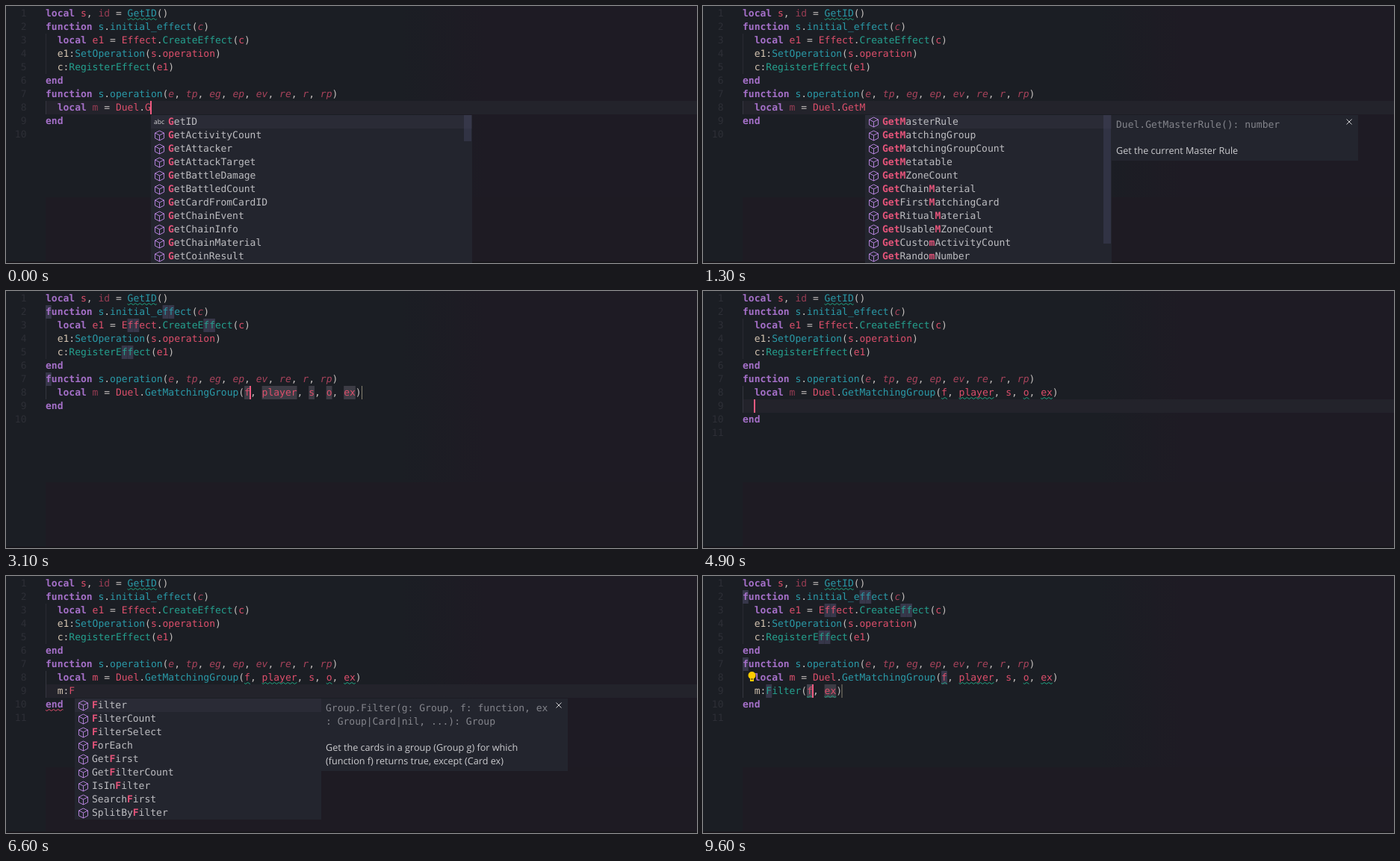
An HTML page with a canvas that plays this animation: 925x344 px, repeating every 9.7 s.

```html
<!DOCTYPE html>
<html lang="en">
<head>
<meta charset="utf-8">
<title>Lua completion</title>
<style>
html, body { margin: 0; width: 100%; height: 100%; overflow: hidden; background: #1b1e24; }
canvas { display: block; }
</style>
</head>
<body>
<canvas id="stage" width="925" height="344"></canvas>
<script>
const ctx = document.getElementById('stage').getContext('2d');
const LOOP = 9700, LEFT = 53, ROW = 18;
const MONO = '13px "DejaVu Sans Mono", monospace';
const SANS = '12.63px "Open Sans", sans-serif';
const GREEN = '#1fa583', RED = '#e5506f', PINK = '#ee5a80';

ctx.textRendering = 'geometricPrecision';
ctx.font = MONO;
const CHAR = ctx.measureText('m').width;

// The first letter of a token picks its style.
const STYLES = {
  k: ['bold', '#a570c9'], r: ['', '#dd4f6b'], d: ['', '#973c53'], i: ['italic', '#a8435b'],
  t: ['', '#2a9aa8'], g: ['', '#25a18f'], w: ['', '#d3c3b0'], p: ['', '#c4bfbd']
};

const HEAD = [
  'klocal|r s|p, |did|p = |tGetID|p()',
  'kfunction|t s|p.|tinitial_effect|p(|ic|p)',
  'p  |klocal|r e1|p = |rEffect|p.|gCreateEffect|p(|rc|p)',
  'w  e1|p:|tSetOperation|p(|rs|p.|roperation|p)',
  'w  c|p:|gRegisterEffect|p(|re1|p)',
  'kend',
  'kfunction|t s|p.|toperation|p(|' +
    'e tp eg ep ev re r rp'.split(' ').map(s => 'i' + s).join('|p, |') + '|p)'
];

const GET_ITEMS = ('GetID GetActivityCount GetAttacker GetAttackTarget GetBattleDamage GetBattledCount ' +
  'GetCardFromCardID GetChainEvent GetChainInfo GetChainMaterial GetCoinResult').split(' ');
const GETM_ITEMS = ('GetMasterRule GetMatchingGroup GetMatchingGroupCount GetMetatable GetMZoneCount ' +
  'GetChainMaterial GetFirstMatchingCard GetRitualMaterial GetUsableMZoneCount ' +
  'GetCustomActivityCount GetRandomNumber').split(' ');
const M_ITEMS = ['m', 'math', 'module', 'setmetatable'];
const GROUP_ITEMS = ('AddCard CheckSameProperty CheckWithSumEqual CheckWithSumGreater Clear Clone ' +
  'CreateGroup DeleteGroup Equal Filter').split(' ');
const F_ITEMS = ('Filter FilterCount FilterSelect ForEach GetFirst GetFilterCount ' +
  'IsInFilter SearchFirst SplitByFilter').split(' ');

const DOCS = {
  GetMasterRule: ['Duel.GetMasterRule(): number', 'Get the current Master Rule'],
  GetMatchingGroup: [
    'Duel.GetMatchingGroup(f: function, pla\nyer: number, s: number, o: number, ex:\n Group|Card|nil, ...): Group',
    "Get all cards in locations (int s) (on (int player)'s\nside of the field) and (int o) (on their opponent's)\nfor which (function f) returns true, except (Card ex)"],
  GetMatchingGroupCount: [
    'Duel.GetMatchingGroupCount(f: functio\nn, player: number, s: number, o: numbe\nr, ex: Group|Card|nil, ...): number',
    "Get the number of cards in locations (int s) (on (int\nplayer)'s side of the field) and (int o) (on their\nopponent's) for which (function f) returns true,\nexcept (Card ex)"],
  AddCard: ['Group.AddCard(g: Group, c: Card)', 'Add a card (Card c) to a group (Group g)'],
  Filter: [
    'Group.Filter(g: Group, f: function, ex\n: Group|Card|nil, ...): Group',
    'Get the cards in a group (Group g) for which\n(function f) returns true, except (Card ex)']
};

const colX = col => LEFT + col * CHAR;
const lineY = line => 1 + (line - 1) * ROW;
const within = (t, from, to) => t >= from && t < to;
// Value of the last [start, value] step that has begun.
const pick = (t, steps) => steps.filter(s => t >= s[0]).pop()[1];

function rect(x, y, w, h, color) {
  ctx.fillStyle = color;
  ctx.fillRect(x, y, w, h);
}

function text(str, x, y, color, font = MONO) {
  ctx.font = font;
  ctx.fillStyle = color;
  ctx.fillText(str, x, y);
}

function path(points, color, close) {
  ctx.beginPath();
  points.forEach(p => ctx.lineTo(...p));
  if (close) ctx.closePath();
  ctx.strokeStyle = color;
  ctx.lineWidth = 1;
  ctx.stroke();
}

function background() {
  rect(0, 0, 925, 344, '#1b1e24');
  const glow = ctx.createLinearGradient(530, 0, 640, 0);
  glow.addColorStop(0, '#1e1b2400');
  glow.addColorStop(1, '#1e1b24');
  rect(530, 0, 395, 256, glow);
  rect(LEFT, 256, 872, 88, '#1e1b23');
  rect(0, 342, 925, 2, '#17161b');
}

function codeLine(tokens, line) {
  let col = 0;
  for (const token of tokens.split('|')) {
    const [weight, color] = STYLES[token[0]], str = token.slice(1);
    text(str, colX(col), lineY(line) + 13, color, weight + ' ' + MONO);
    col += str.length;
  }
}

function mark(line, col, len, color) {
  rect(colX(col), lineY(line), len * CHAR, ROW, color);
}

function squiggle(line, col, len, color) {
  const x = colX(col), y = lineY(line) + 15, points = [];
  for (let k = -1; k * 3 < len * CHAR + 3; k++) points.push([x + k * 3 + 1.7, y + (k % 2 ? .5 : 2.5)]);
  ctx.save();
  ctx.beginPath();
  ctx.rect(x, y - 1, len * CHAR, 5);
  ctx.clip();
  path(points, color);
  ctx.restore();
}

function cube(x, y) {
  const hex = [[0, -6.5], [6, -3.5], [6, 3.5], [0, 6.5], [-6, 3.5], [-6, -3.5]].map(p => [x + p[0], y + p[1]]);
  path(hex, '#b180d7', true);
  path([hex[5], [x, y - .5], hex[1]], '#b180d7');
  path([[x, y - .5], hex[3]], '#b180d7');
}

function bulb(line) {
  const y = lineY(line);
  ctx.beginPath();
  ctx.arc(65.5, y + 6, 5, 0, 7);
  ctx.fillStyle = '#fc0';
  ctx.fill();
  rect(63, y + 10, 5, 4, '#fc0');
  rect(64, y + 10.5, 3, 1, '#1b1e24');
}

function docPanel(name, x, y) {
  const [sig, body] = DOCS[name].map(s => s.split('\n'));
  const bodyY = y + 17 + (sig.length - 1) * ROW + 35;
  rect(x, y, 330, bodyY + (body.length - 1) * ROW + 9 - y, '#23252e');
  sig.forEach((s, i) => text(s, x + 6, y + 17 + i * ROW, '#83848b'));
  body.forEach((s, i) => text(s, x + 6, bodyY + i * ROW, '#cbcbce', SANS));
  const cx = x + 318, cy = y + 9;
  path([[cx - 3.5, cy - 3.5], [cx + 3.5, cy + 3.5]], '#d0d0d2');
  path([[cx + 3.5, cy - 3.5], [cx - 3.5, cy + 3.5]], '#d0d0d2');
}

function popup({ line, col, items, query, sel = 0, doc, thumb = 0 }) {
  const x = Math.round(colX(col)), top = lineY(line + 1) + 1, width = doc ? 330 : 430;
  rect(x, top, width, items.length * ROW, '#23252e');
  rect(x, top + sel * ROW, width, ROW, '#2a2b36');
  items.forEach((item, i) => {
    const y = top + i * ROW;
    if (item === 'GetID') text('abc', x + 4, y + 12, '#d8d8da', '8.5px "Open Sans", sans-serif');
    else cube(x + 11.5, y + 9.5);
    let q = 0;
    [...item].forEach((ch, k) => {
      const hit = q < query.length && ch.toLowerCase() === query[q].toLowerCase();
      if (hit) q++;
      text(ch, x + 23 + k * CHAR, y + 13, hit ? '#e5547a' : '#bdbdc1', (hit ? 'bold ' : '') + MONO);
    });
  });
  rect(x + width - 11, top, 10, thumb, '#50507055');
  if (doc) docPanel(items[sel], x + width, top);
}

function popupAt(t) {
  if (t < 800) {
    const query = pick(t, [[0, 'G'], [300, 'Ge'], [500, 'Get']]);
    return { line: 8, col: 17 + query.length, items: GET_ITEMS, query, thumb: t < 500 ? 35 : 43 };
  }
  if (t < 3000) {
    const sel = pick(t, [[800, 0], [1500, 1], [1800, 2], [2100, 1]]);
    return { line: 8, col: 21, items: GETM_ITEMS, query: 'GetM', sel, doc: t >= 900, thumb: 172 };
  }
  if (within(t, 5300, 5700)) return { line: 9, col: 3, items: M_ITEMS, query: 'm' };
  if (within(t, 5700, 6200)) return { line: 9, col: 4, items: GROUP_ITEMS, query: '', doc: t >= 5800, thumb: 70 };
  if (within(t, 6200, 7500)) return { line: 9, col: 5, items: F_ITEMS, query: 'F', doc: true };
}

function draw(t) {
  const entered = t >= 4500;
  const args = 'f player s o ex'.split(' ').map(s => 'r' + s).join('|p, |');
  const call = pick(t, [[0, 'rG'], [300, 'rGe'], [500, 'rGet'], [800, 'rGetM'],
    [3000, 'tGetMatchingGroup|p(|' + args + '|p)']]);
  const lines = [...HEAD, `p  |klocal|${t < 5300 ? 'd' : 'r'} m|p = |rDuel|p.|${call}`];
  if (entered) lines.push(pick(t, [[0, 'p  '], [5300, 'w  m'], [5700, 'w  m|p:'], [6200, 'w  m|p:|rF'],
    [7500, 'w  m|p:|gFilter|p(|rf|p, |rex|p)']]));
  lines.push('kend', 'p');

  background();
  const snippet8 = within(t, 3000, 4200), snippet9 = t >= 7500;
  if (!snippet8 && !snippet9) rect(LEFT, lineY(entered ? 9 : 8), 872, ROW, '#23232b');

  // Occurrences of the selected "f"
  if (within(t, 3100, 4200) || snippet9) lines.forEach((tokens, i) => {
    const plain = tokens.split('|').map(s => s.slice(1)).join('');
    for (const m of plain.matchAll(/f/gi)) mark(i + 1, m.index, 1, '#37374a');
  });
  if (snippet8) {
    for (const [col, len] of [[34, 1], [37, 6], [45, 1], [48, 1], [51, 2]]) mark(8, col, len, '#3d3c45');
    rect(476, lineY(8), 1, ROW, '#85806f');
  }
  if (snippet9) {
    mark(9, 11, 1, '#45444e');
    mark(9, 14, 2, '#3d3c45');
    rect(185.5, lineY(9), 1, ROW, '#85806f');
  }

  [3, 4, 5, 8].forEach(n => rect(LEFT, lineY(n), 1, ROW, n === 8 ? '#34363f' : '#292b32'));
  if (t >= 4900) rect(LEFT, lineY(9), 1, ROW, '#34363f');

  lines.forEach((tokens, i) => {
    text(i + 1, 27.5 - String(i + 1).length * CHAR, lineY(i + 1) + 13, '#2d2f36');
    codeLine(tokens, i + 1);
  });

  squiggle(1, 14, 5, GREEN);
  if (t >= 3300) [[34, 1], [37, 6], [48, 1], [51, 2]].forEach(s => squiggle(8, ...s, GREEN));
  if (within(t, 5300, 7500)) squiggle(10, 0, 3, RED);
  if (within(t, 7500, 7700)) squiggle(9, 4, 1, RED);
  if (t >= 7700) [[11, 1], [14, 2]].forEach(s => squiggle(9, ...s, GREEN));

  if (within(t, 3600, 4600)) bulb(7);
  if (t >= 8000) bulb(8);

  const blinkOff = [[1300, 1900], [2300, 3000], [3600, 4100], [5000, 5300], [6000, 6200],
    [6600, 7100], [8000, 8600], [9200, 9600]];
  if (!blinkOff.some(span => within(t, ...span))) {
    const col = pick(t, [[0, 18], [300, 19], [500, 20], [800, 21], [3000, 35], [4200, 54],
      [4500, 2], [5300, 3], [5700, 4], [6200, 5], [7500, 12]]);
    rect(Math.floor(colX(col) - .5), lineY(entered ? 9 : 8), 2, ROW, PINK);
  }

  const list = popupAt(t);
  if (list) popup(list);
}

function frame() {
  draw(performance.now() % LOOP);
  requestAnimationFrame(frame);
}
frame();
</script>
</body>
</html>
```
